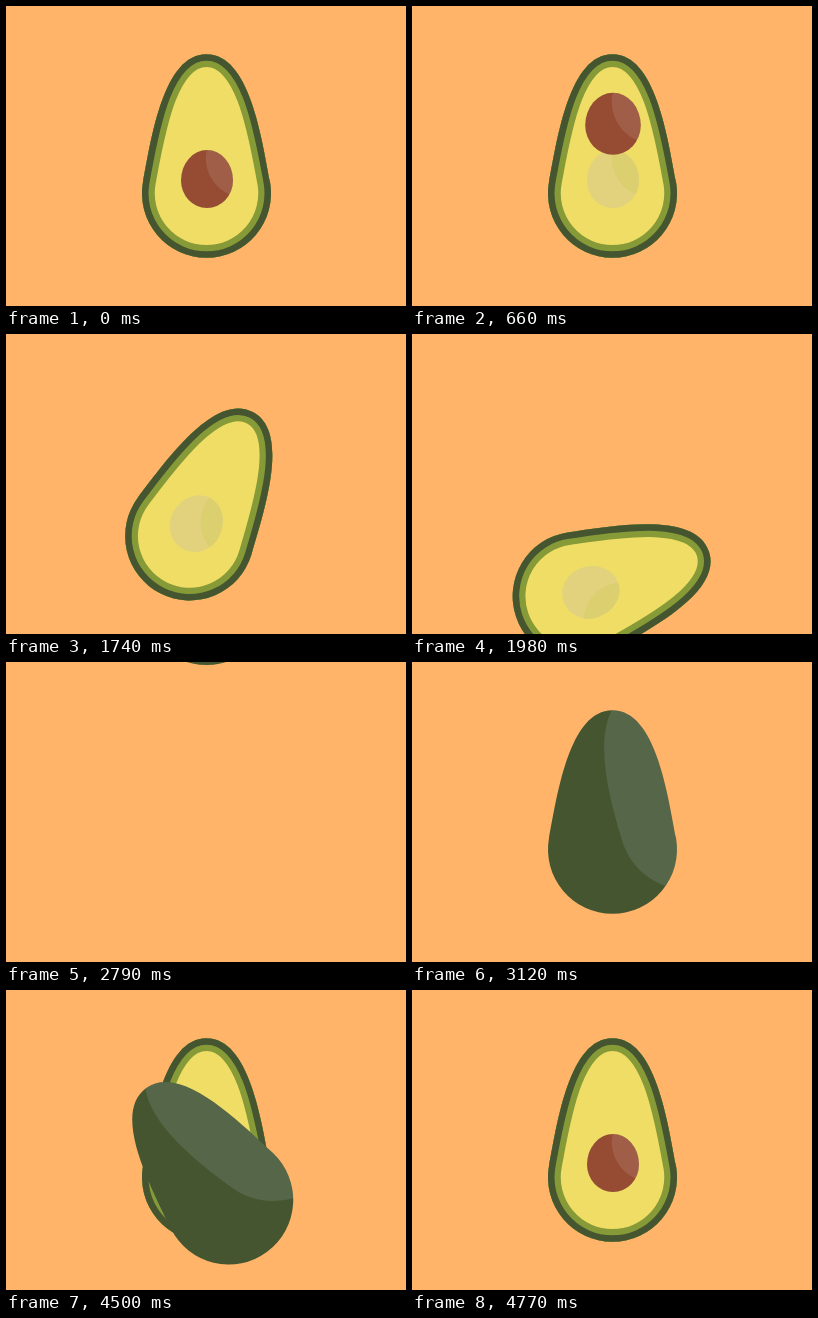
These frames come from a looping animation (400x300 px, 5.37 s). An HTML page:

```html
<!DOCTYPE html>
<html lang="en">
<head>
<meta charset="utf-8">
<title>Avocado</title>
<style>
  html, body { margin: 0; width: 100%; height: 100%; overflow: hidden; background: #ffb46a; }
  svg { display: block; width: 100%; height: 100%; }
  #half, #whole { transform-origin: 200.5px 150px; }
  #seed { transform-origin: 201px 173px; }
</style>
</head>
<body>
<svg viewBox="0 0 400 300">
  <defs>
    <path id="body" d="M200.5 48.2C243.5 48.2 255.5 131 264 176A64.5 64.5 0 1 1 137 176C145.5 131 157.5 48.2 200.5 48.2Z"/>
    <path id="egg" d="M175 174.500A26 30.500 0 0 1 227 174.500A26 27.500 0 0 1 175 174.500Z"/>
    <path id="eggLight" d="M201 143C196 162 207 184 228 190H240V140Z"/>
    <clipPath id="inBody"><use href="#body"/></clipPath>
    <clipPath id="inEgg"><use href="#egg"/></clipPath>
  </defs>

  <g id="half">
    <use href="#body" fill="#44552f"/>
    <g clip-path="url(#inBody)">
      <use href="#body" fill="#efdd65" stroke="#879a38" stroke-width="25.500"/>
      <use href="#body" fill="none" stroke="#44552f" stroke-width="13"/>
    </g>
    <use href="#egg" fill="#e2d27e"/>
    <use href="#eggLight" fill="#dccf70" clip-path="url(#inEgg)"/>
  </g>

  <g id="seed">
    <use href="#egg" fill="#954c33"/>
    <use href="#eggLight" fill="#fff" fill-opacity=".1" clip-path="url(#inEgg)"/>
  </g>

  <g id="whole">
    <use href="#body" fill="#44552f"/>
    <g clip-path="url(#inBody)" fill="#d0e0ff" fill-opacity=".125">
      <path d="M200 48C183 80 197 135 209 175C216 200 231 215 253 224H300V40Z"/>
      <path id="shine" d="M0 -30.500L400 369.500V430.500L0 30.500Z"/>
    </g>
  </g>
</svg>
<script>
  const LOOP = 5370;
  const DROP = 'cubic-bezier(.7, 0, 1, .42)';
  const TIP = 'cubic-bezier(.4, .08, .85, .8)';
  const AWAY = '0px 600px';
  const HOME = '0px 0px';

  // Each step: [time in ms, value, easing towards the next step]
  function play(id, property, steps) {
    const frames = steps.map(([time, value, easing = 'linear']) =>
      ({ offset: time / LOOP, [property]: value, easing }));
    document.getElementById(id).animate(frames, { duration: LOOP, iterations: Infinity });
  }

  const REVEAL = 4140;

  play('seed', 'translate', [
    [0, HOME], [570, HOME, 'ease-out'], [750, '0px -80px', 'ease-in'],
    [960, '0px 160px'], [960, AWAY], [REVEAL, AWAY], [REVEAL, HOME], [LOOP, HOME]
  ]);
  play('seed', 'scale', [
    [0, '1'], [570, '1', 'ease-out'], [750, '1.1'], [960, '1.1'],
    [960, '1'], [LOOP, '1']
  ]);

  play('half', 'translate', [
    [0, HOME], [1470, HOME, DROP], [2070, '0px 250px'], [2070, AWAY],
    [REVEAL, AWAY], [REVEAL, HOME], [LOOP, HOME]
  ]);
  play('half', 'rotate', [
    [0, '0deg'], [1470, '0deg', TIP], [2070, '90deg'], [2070, '0deg'], [LOOP, '0deg']
  ]);

  play('whole', 'translate', [
    [0, AWAY], [2790, AWAY], [2790, '0px -250px', 'ease-out'], [3120, HOME],
    [4170, HOME, DROP], [4770, '0px 250px'], [4770, AWAY], [LOOP, AWAY]
  ]);
  play('whole', 'rotate', [
    [0, '0deg'], [4170, '0deg', TIP], [4770, '-90deg'], [LOOP, '-90deg']
  ]);

  play('shine', 'translate', [
    [0, '0px -200px'], [3840, '0px -200px'], [4200, '0px 120px'], [LOOP, '0px 120px']
  ]);
</script>
</body>
</html>
```
